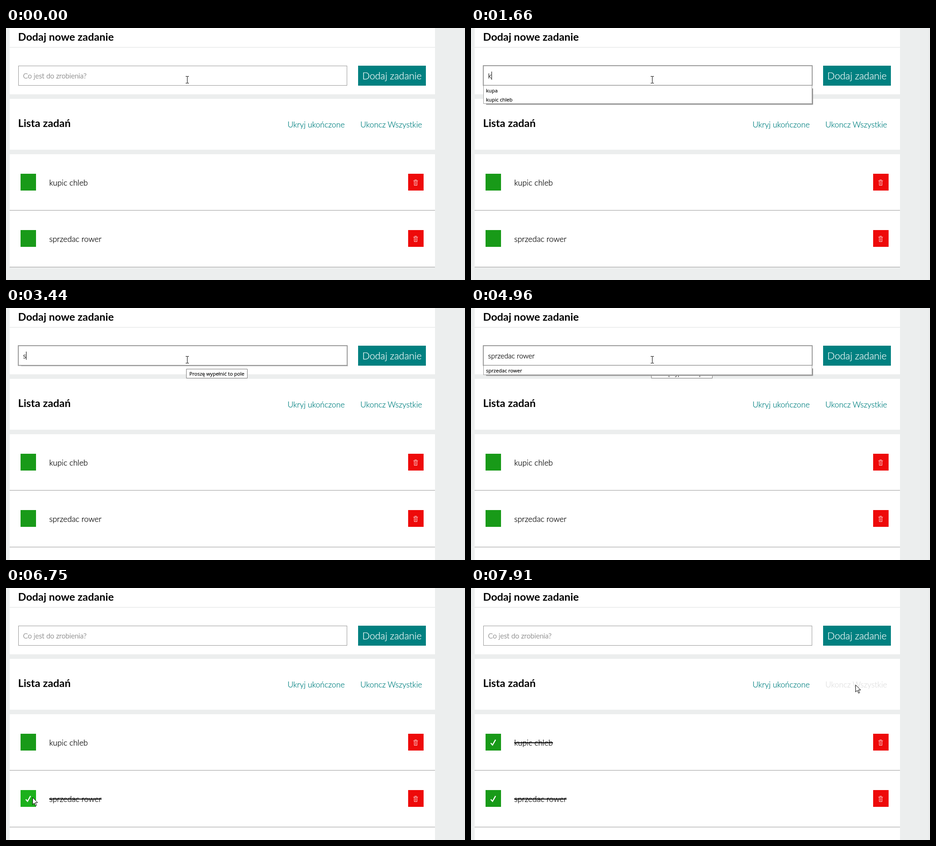
Recreate the animation shown at these times as an HTML page. Size 1009 px wide and 555 px high, loop 8 s.

```html
<!DOCTYPE html>
<html lang="pl">
<head>
<meta charset="utf-8">
<title>Lista zadań</title>
<style>
html, body { margin: 0; width: 100%; height: 100%; overflow: hidden; background: #eceeee; }
svg { display: block; }
text { font: 300 17.5px Lato, sans-serif; white-space: pre;
  fill: currentColor; stroke: currentColor; stroke-width: .25px; }
.head { font-size: 23.4px; font-weight: 700; stroke: none; }
.field { font-size: 15.6px; }
.tiny { font: 11px "Noto Sans", sans-serif; stroke-width: .1px; }
.line { fill: none; stroke: #999; }
.hot { filter: brightness(1.15); }
.done text { text-decoration: line-through; }
.tick { fill: none; stroke: #fff; stroke-width: 2.3; visibility: hidden; }
.done .tick { visibility: visible; }
</style>
</head>
<body>
<svg id="stage" width="1009" height="555" viewBox="0 0 1009 555">
  <path d="M8 0h935v146h-935zM8 156h935v112h-935zM8 278h935v249h-935z" fill="#fff"/>
  <path id="third" d="M8 527h935v28h-935z" fill="#fff"/>
  <path d="M1008 0h1v555h-1z" fill="#f8f8f8"/>
  <path d="M8 42.5h935M1007.5 0v555" stroke="#dfe1e1"/>
  <text class="head" x="26.5" y="28">Dodaj nowe zadanie</text>
  <text class="head" x="26.5" y="218">Lista zadań</text>
  <path d="M774 83h149v44h-149z" fill="#008080"/>
  <text x="848.5" y="113" text-anchor="middle" color="#fff" style="font-size:21.4px">Dodaj zadanie</text>
  <text x="619" y="219" color="#008080">Ukryj ukończone</text>
  <text id="finish" x="779" y="219">Ukoncz Wszystkie</text>

  <g id="rows"></g>

  <rect id="box" class="line"/>
  <text id="typed" class="field" x="37.5" y="111"></text>
  <path id="caret" d="M.5 96v18" stroke="#000"/>
  <g id="tip">
    <path d="M396.5 134.5h134v20h-134z" fill="#fff" stroke="#777"/>
    <text class="tiny" x="403" y="149">Proszę wypełnić to pole</text>
  </g>
  <svg id="popup" y="127" width="760" overflow="hidden">
    <g id="sheet">
      <rect id="shade" x="33" y="6" width="719" rx="1" fill="#999"/>
      <rect id="panel" x="27.5" y="-.5" width="722" fill="#fff" stroke="#999"/>
      <g id="items"></g>
    </g>
  </svg>
  <path id="beam" d="M-3.5 -7.5h3l.5 1 .5 -1h3M0 -7v14M-3.5 7.5h3l.5 -1 .5 1h3" fill="none" stroke="#000"/>
  <path id="arrow" d="M.5 .5v15.5l3.7 -3.5 2.7 6.2 2.4 -1 -2.7 -6h5z" fill="#fff" stroke="#000"/>
</svg>
<script>
const $ = id => document.getElementById(id);
const show = (el, on) => el.style.display = on ? "" : "none";
const clamp = v => Math.max(0, Math.min(1, v));
const LOOP = 8000, FOCUS = 150, BLUR = 6590, BLINK = 530;

// letters arrive evenly between first and last
const words = [
  { text: "kupic chleb", first: 1590, last: 2960, open: 1600, end: 3130 },
  { text: "sprzedac rower", first: 3340, last: 4890, open: 3440, end: 5030 }
];
const past = ["kupa", "kupic chleb", "sprzedac rower", "sprzatanie", "sprawdzic poczte",
  "spacer", "samochod", "szkola"];

// pointer stops: time, x, y
const stops = [
  [0, 398.5, 114], [5810, 398.5, 114], [5930, 338, 141], [BLUR, 58, 461], [6790, 58, 461],
  [7190, 912, 452], [7300, 908, 322], [7410, 880, 232], [7660, 845, 213], [LOOP, 845, 213]
];

function pointer(t) {
  const i = stops.findIndex(s => s[0] > t), a = stops[i - 1], b = stops[i];
  const k = (t - a[0]) / (b[0] - a[0]);
  return [a[1] + (b[1] - a[1]) * k, a[2] + (b[2] - a[2]) * k];
}

const rows = words.map(({ text }, i) => {
  const g = document.createElementNS("http://www.w3.org/2000/svg", "g");
  g.setAttribute("transform", `translate(0 ${278 + 124 * i})`);
  g.innerHTML = `<path d="M32 43h34v37h-34z" fill="#189a18"/>
    <path class="tick" d="M43.5 63.5l3.8 4.3 6.7 -11.6"/>
    <text x="95" y="68.5">${text}</text>
    <path d="M884 43h34v37h-34z" fill="#ee0a0a"/>
    <path d="M898 56.5h5M895.5 58.5h10M897.5 59v9.5h6v-9.5M900.5 60v7" fill="none" stroke="#fff" stroke-opacity=".85"/>
    <path class="line" d="M8 ${123.5 + i}h935"/>`;
  $("rows").append(g);
  const [check, , , bin] = g.children;
  return { g, top: 321 + 124 * i, parts: [[check, 32], [bin, 884]], doneAt: [7690, 6640][i] };
});

function drawPopup(word, text, t) {
  const list = word ? past.filter(p => p.startsWith(text)).slice(0, 6) : [];
  const h = list.length * 19.5 + 1, full = h + 3;
  const seen = word ? full * clamp((t - word.open) / 60) : 0;
  show($("popup"), seen > 0);
  $("popup").setAttribute("height", seen);
  $("sheet").setAttribute("transform", `translate(0 ${seen - full})`);
  $("panel").setAttribute("height", h);
  $("shade").setAttribute("height", Math.max(0, h - 4));
  $("items").innerHTML = list.map((s, i) =>
    `<text class="tiny" x="33" y="${15 + 19.5 * i}">${s}</text>`).join("");
}

function drawField(t) {
  const word = words.find(w => t >= w.first && t < w.end);
  const gap = word && (word.last - word.first) / (word.text.length - 1);
  const count = word ? Math.min(word.text.length, 1 + Math.floor((t - word.first) / gap)) : 0;
  const text = word ? word.text.slice(0, count) : "";

  const focus = t >= FOCUS && t < BLUR;
  const [x, y, width, height, line] = focus ? [27, 83, 723, 43.5, 2] : [27.5, 83.5, 722, 43, 1];
  for (const [k, v] of Object.entries({ x, y, width, height, "stroke-width": line }))
    $("box").setAttribute(k, v);
  $("typed").textContent = text || "Co jest do zrobienia?";
  $("typed").setAttribute("color", text ? "#000" : "#777");

  const past = words.filter(w => w.end <= t).at(-1);
  const since = word ? word.first + (count - 1) * gap : past ? past.end : 170;
  const sent = t > 4950 && t < words[1].end;
  show($("caret"), focus && !sent && t >= since && (t - since) % (2 * BLINK) < BLINK);
  const end = text ? $("typed").getComputedTextLength() : 0;
  $("caret").setAttribute("transform", `translate(${Math.round(37.5 + end)} 0)`);
  $("tip").style.opacity = clamp((t - 690) / 70) * clamp((5630 - t) / 160);
  drawPopup(word, text, t);
}

function draw(t) {
  drawField(t);
  show($("third"), t >= words[0].end);
  const [px, py] = pointer(t), inField = py < 127;
  for (const { g, top, parts, doneAt } of rows) {
    g.classList.toggle("done", t >= doneAt);
    for (const [el, left] of parts)
      el.classList.toggle("hot", px >= left && px < left + 34 && py >= top && py < top + 37);
  }
  const fade = clamp((t - 7670) / 210);
  const mix = (a, b) => Math.round(a + (b - a) * fade);
  $("finish").setAttribute("color", `rgb(${mix(0, 222)},${mix(128, 222)},${mix(128, 222)})`);
  $("finish").classList.toggle("hot", t >= 7450 && t < 7670);
  show($("beam"), inField);
  show($("arrow"), !inField);
  $(inField ? "beam" : "arrow").setAttribute("transform",
    `translate(${inField ? px : Math.round(px)} ${Math.round(py)})`);
}

const start = performance.now();
function tick() {
  draw((performance.now() - start) % LOOP);
  requestAnimationFrame(tick);
}
tick();
</script>
</body>
</html>
```
